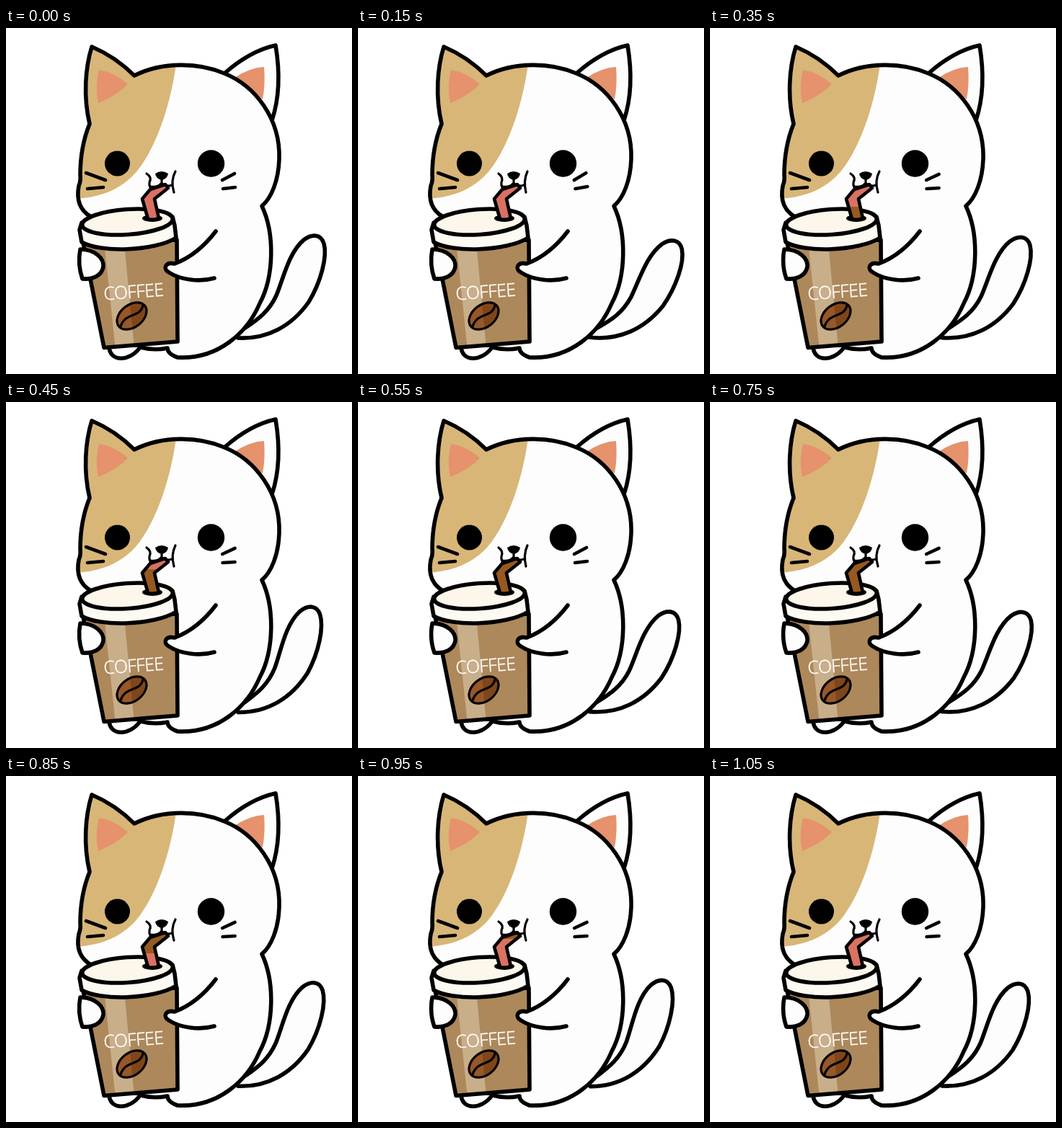
An HTML page that plays this animation: 480 by 480 pixels, repeating every 1100 ms.

```html
<!DOCTYPE html>
<html lang="en">
<head>
<meta charset="utf-8">
<title>Cat with coffee</title>
<style>
  html, body { margin: 0; width: 100%; height: 100%; overflow: hidden; background: #fff; }
  svg { display: block; width: 100vw; height: 100vh; }
  .ink { stroke: #000; stroke-width: 5.6; stroke-linecap: round; stroke-linejoin: round; }
  .thin { stroke-width: 4.6; }
  .fine { stroke-width: 3.2; }
  .fur { fill: #fdfdfd; }
  .line { fill: none; }
  .ear { fill: #e5926d; }
  .label { font: 300 25px "Open Sans", "Noto Sans", sans-serif; letter-spacing: -0.6px;
    fill: #fff; stroke: #fff; stroke-width: 0.5; }
</style>
</head>
<body>
<svg viewBox="0 0 480 480">
  <defs>
    <path id="bodyShape" d="M116 133 C107 95 110 55 119 26 Q152 40 178 66 C218 46 268 48 303 63
      C345 80 381 125 379 182 C378 212 368 236 355 247 C373 285 372 345 352 382
      C335 422 295 460 238 457 Q224 452 224 444 Q205 448 187 443 L145 443 L118 350 L118 262
      C104 254 97 240 101 219 Q104 212 103 204 C103 180 107 155 116 133 Z"/>
    <path id="cupShape" d="M107 298 L136 443.500 L238 435 L237 294 Z"/>
    <path id="shine" d="M136 296 L164 298 L178 445 L152 447 Z"/>
    <path id="strawShape" d="M197 265 L189 237 L200 224 L221 217 L225 222 L206 237 L212 264 Q204 267 197 265 Z"/>
    <ellipse id="beanShape" cx="174.500" cy="399.500" rx="23" ry="15.500" transform="rotate(-38 174.500 399.500)"/>
    <clipPath id="bodyClip"><use href="#bodyShape"/></clipPath>
    <clipPath id="cupClip"><use href="#cupShape"/></clipPath>
    <clipPath id="strawClip"><use href="#strawShape"/></clipPath>
    <clipPath id="beanClip"><use href="#beanShape"/></clipPath>
  </defs>

  <path id="tail" class="ink fur" d="M322 430 C362 432 396 414 420 380 C437 352 446 317 441 299
    C437 286 425 285 413 294 C392 312 385 347 375 371 C365 393 350 404 332 416"/>

  <!-- right ear -->
  <path class="ink fur" d="M303 63 Q338 32 374 24 C380 60 380 95 369 128"/>
  <path class="ear" d="M317 69 Q338 55 358 54 Q360 78 356 99 Z"/>

  <!-- body and head -->
  <use href="#bodyShape" class="fur"/>
  <path clip-path="url(#bodyClip)" fill="#d8b677" d="M80 0 H240 L236 50 C228 110 205 176 175 206 C155 225 130 235 96 237 Z"/>
  <use href="#bodyShape" class="ink line"/>
  <path class="ear" d="M129 58 Q152 62 169 78 Q153 94 128 104 Q123 80 129 58 Z"/>
  <path class="ink fur" d="M143 442 C144 464 172 463 186 443"/>

  <!-- face -->
  <circle cx="154.500" cy="188" r="17.500"/>
  <circle cx="284.500" cy="188" r="18.700"/>
  <path class="ink thin line" d="M111 201 L138 211 M113 223 L135 221"/>
  <path id="whiskers" class="ink thin line" d="M300 211 L317 202 M301 223 L318 221"/>
  <path d="M207 202 Q216 196 225 202 Q224 209 216 211 Q208 209 207 202 Z"/>
  <path class="ink fine line" d="M216 209 V216 M200 220 Q210 222 216 215 Q221 221 230 218"/>
  <path id="cheeks" class="ink fine line"/>

  <!-- cup -->
  <use href="#cupShape" fill="#ad885b"/>
  <use href="#shine" clip-path="url(#cupClip)" fill="#c9ae8a"/>
  <use href="#cupShape" class="ink line"/>
  <text class="label" x="136" y="377.500" transform="rotate(-4 136 377.500)">COFFEE</text>
  <use href="#beanShape" fill="#80461a"/>
  <use href="#shine" clip-path="url(#beanClip)" fill="#965828"/>
  <use href="#beanShape" class="ink fine line"/>
  <path class="ink fine line" d="M190 385 C186 403 166 393 159 414"/>

  <!-- lid -->
  <path class="ink" fill="#fdf9f3" d="M105 270 L102 280 L105 297 C130 312 206 310 236 291 L234 274 L231 262 Z"/>
  <ellipse class="ink" fill="#fdf6ea" cx="168.500" cy="269" rx="63" ry="17.500" transform="rotate(-4 168.500 269)"/>

  <!-- paws -->
  <path class="ink fur" d="M103 307 C124 307 136 320 135 331 C133 344 120 349 106 348 Q99 328 103 307 Z"/>
  <path class="ink fur" d="M291 282 C275 303 255 319 234 327 C221 324 217 334 226 339 C241 349 268 353 289 347"/>

  <!-- straw -->
  <ellipse cx="203" cy="264" rx="14" ry="5"/>
  <use href="#strawShape" fill="#d97262"/>
  <rect id="drink" x="180" width="55" clip-path="url(#strawClip)" fill="#965a20"/>
  <use href="#strawShape" class="ink thin line"/>
</svg>
<script>
  const LOOP = 1100;
  const FULL = 212, EMPTY = 268;
  // start ms, tail degrees, drink top, drink bottom, cheek pull, whisker degrees
  const steps = [
    [0, 0, EMPTY, EMPTY, 0, 0],
    [50, 2.2, EMPTY, EMPTY, 0.5, 0],
    [150, 4, EMPTY, EMPTY, 1, -3],
    [250, 3, 262, EMPTY, 0.5, 0],
    [350, 1.4, 248, EMPTY, 0, 3],
    [450, -2.5, 232, EMPTY, 0.5, 3],
    [550, 1.7, FULL, EMPTY, 1, 0],
    [650, 4.5, FULL, EMPTY, 0.5, 0],
    [750, 2, FULL, EMPTY, 0, 3],
    [850, -0.8, FULL, 246, 0, 3],
    [950, -3, FULL, 226, 0, 3],
    [1050, 0, EMPTY, EMPTY, 0, 3]
  ];
  const $ = id => document.getElementById(id);
  const tail = $("tail"), drink = $("drink"), cheeks = $("cheeks"), whiskers = $("whiskers");
  let shown;

  function draw(now) {
    const t = now % LOOP;
    const step = steps.findLast(s => s[0] <= t);
    if (step !== shown) {
      shown = step;
      const [, swing, top, bottom, pull, tilt] = step;
      tail.setAttribute("transform", `rotate(${swing} 335 422)`);
      whiskers.setAttribute("transform", `rotate(${tilt} 300 214)`);
      drink.setAttribute("y", top);
      drink.setAttribute("height", bottom - top);
      const l = 203 - pull, r = 228 + pull;
      cheeks.setAttribute("d", `M195 202 Q${l} 207 199 214 Q198 221 204 225 M235 199 Q${r} 212 233 228`);
    }
    requestAnimationFrame(draw);
  }
  draw(performance.now());
</script>
</body>
</html>
```
